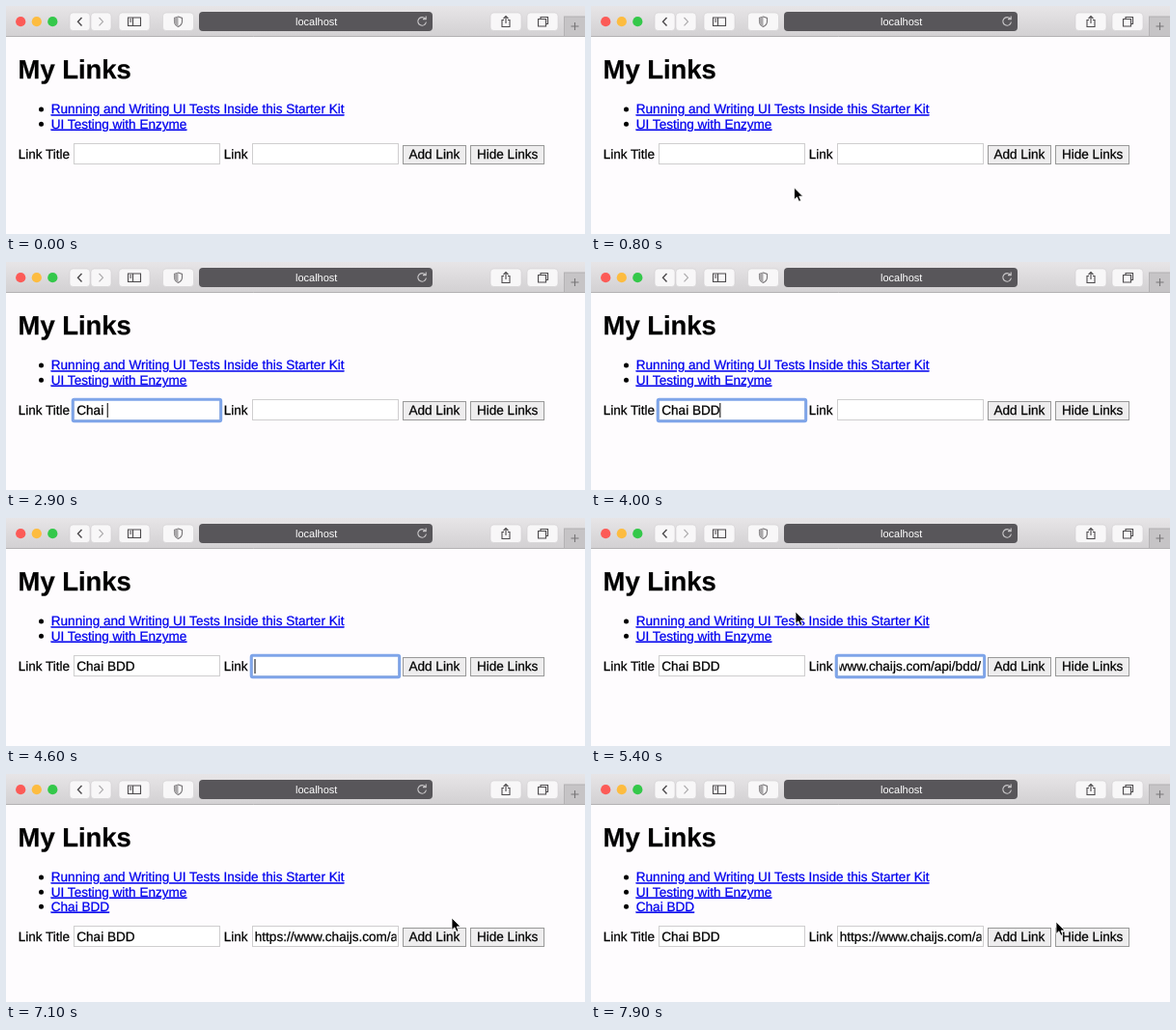
Write an HTML page that moves like this. It is 600x236 px and loops after 8000 ms.

```html
<!DOCTYPE html>
<html lang="en">
<head>
<meta charset="utf-8">
<title>My Links</title>
<style>
html, body { margin: 0; width: 100%; height: 100%; overflow: hidden; background: #fefcfe; }
svg { display: block; width: 600px; height: 236px; }
text { font: 13.55px "Liberation Sans", Arial, sans-serif; white-space: pre; stroke: #000; stroke-width: .25; text-rendering: geometricPrecision; }
.link { fill: #00e; stroke: #00e; text-decoration: underline; }
.tool { fill: #f8f7f8; stroke: #d0ced0; stroke-width: .6; }
.icon { fill: none; stroke: #4c4a4c; stroke-width: 1.1; }
.field { fill: #fff; stroke: #cfcecf; }
.ring { fill: none; stroke: #7fa5e9; stroke-width: 3; }
.button { fill: #eeedee; stroke: #999; }
.pressed rect { fill: #ababab; stroke: #ababab; }
.pressed text { fill: #fff; stroke: #fff; }
</style>
</head>
<body>
<svg viewBox="0 0 600 236">
  <defs>
    <linearGradient id="bar" x2="0" y2="1">
      <stop stop-color="#e7e5e7"/><stop offset="1" stop-color="#d2d0d2"/>
    </linearGradient>
    <clipPath id="clip"><rect x="257.5" y="140" width="147" height="28"/></clipPath>
  </defs>

  <rect width="600" height="236" fill="#fefcfe"/>
  <rect width="600" height="32" fill="url(#bar)"/>
  <path d="M0 31.5H600" stroke="#b4b2b4"/>
  <circle cx="15.2" cy="16.2" r="5.1" fill="#fc5b57"/>
  <circle cx="31.8" cy="16.2" r="5.1" fill="#fdbc40"/>
  <circle cx="48.3" cy="16.2" r="5.1" fill="#34c84a"/>
  <g class="tool">
    <rect x="66" y="7" width="21" height="18.5" rx="3.5"/>
    <rect x="88" y="7" width="21" height="18.5" rx="3.5"/>
    <rect x="117" y="7" width="32" height="18.5" rx="3.5"/>
    <rect x="162.5" y="7" width="32" height="18.5" rx="3.5"/>
    <rect x="502" y="7" width="32" height="18.5" rx="3.5"/>
    <rect x="540" y="7" width="32" height="18.5" rx="3.5"/>
  </g>
  <rect x="200" y="6" width="242" height="20" rx="4" fill="#58565a"/>
  <text x="321.7" y="20" text-anchor="middle" style="font-size:11px;fill:#fff;stroke:none">localhost</text>
  <path d="M434.5 13.2A4.3 4.3 0 1 0 435.4 16.5M435.2 10.5V13.6H432" class="icon" style="stroke:#c9c7c9"/>
  <g class="icon">
    <path d="M78.5 12L74.5 16.2L78.5 20.4" style="stroke-width:1.4"/>
    <path d="M96.5 12L100.5 16.2L96.5 20.4" style="stroke:#aaa8aa"/>
    <path d="M126.5 12H139.5V20.5H126.5ZM131.5 12V20.5M128 14H130.3M128 16H130.3"/>
    <path d="M178.5 11L182.5 12.5V16Q182.5 19.5 178.5 21.5Q174.5 19.5 174.5 16V12.5Z" style="stroke:#777577"/>
    <path d="M178.5 11V21.5Q174.5 19.5 174.5 16V12.5Z" style="fill:#aaa8aa;stroke:none"/>
    <path d="M516 14.5H514V21.5H522V14.5H520M518 18V10.5M515.5 13L518 10.5L520.5 13"/>
    <path d="M554 13.5V11.5H561.5V18.5H559.5M551.5 13.5H559.5V21H551.5Z"/>
  </g>
  <rect x="578.5" y="11" width="22" height="20.5" fill="#c6c4c6" stroke="#b4b2b4"/>
  <path d="M589.5 17V25M585.5 21H593.5" class="icon" style="stroke:#777577"/>

  <text x="12.6" y="75" style="font-size:27.4px;font-weight:bold">My Links</text>
  <g><circle cx="36.5" cy="107" r="2.5"/><text class="link" x="46.8" y="111.3">Running and Writing UI Tests Inside this Starter Kit</text></g>
  <g><circle cx="36.5" cy="122.3" r="2.5"/><text class="link" x="46.8" y="126.6">UI Testing with Enzyme</text></g>
  <g id="added"><circle cx="36.5" cy="137.3" r="2.5"/><text class="link" x="46.8" y="141.6">Chai BDD</text></g>

  <g id="form">
    <text x="12.7" y="158">Link Title</text>
    <rect class="field" x="70.5" y="142.5" width="151" height="21"/>
    <text id="title" x="73.3" y="158"></text>
    <text x="225.8" y="158">Link</text>
    <rect class="field" x="255.5" y="142.5" width="151" height="21"/>
    <g clip-path="url(#clip)"><text id="url" y="158"></text></g>
    <rect class="ring" id="ring" y="142.3" width="153.5" height="22.4" rx="1.5"/>
    <path id="caret" d="M0 146V161" stroke="#000"/>
    <g id="add">
      <rect class="button" x="411.5" y="144.5" width="65" height="19"/>
      <text x="417.5" y="158">Add Link</text>
    </g>
    <rect class="button" x="481.5" y="144.5" width="76" height="19"/>
    <text x="488" y="158">Hide Links</text>
  </g>
  <path id="mouse" d="M0 0V12.5L2.9 9.8L4.9 14.3L7 13.4L5.1 9H9Z" stroke="#fff" stroke-width=".8"/>
</svg>
<script>
const $ = id => document.getElementById(id);
const LOOP = 8000, FOCUS = 1100, TAB = 4400, PASTE = 4800, PRESS = 6200, RELEASE = 6400, ADD = 6500;
const keys = [1700, 2000, 2200, 2500, 2900, 3200, 3500, 3800];
const title = "Chai BDD", address = "https://www.chaijs.com/api/bdd/";

// Pointer stops: time, x, y
const enter = [[500, 230, 236], [1050, 196, 152]];
const leave = [[5300, 212, 97], [5400, 212, 97], [5800, 305, 188], [6150, 444, 151],
  [6600, 444, 151], [7050, 462, 149], [7300, 462, 149], [7800, 482, 153], [LOOP, 482, 153]];

const show = (id, on) => $(id).style.display = on ? "" : "none";

function along(path, t) {
  const next = path.findIndex(p => p[0] > t);
  const i = next < 0 ? path.length - 1 : Math.max(1, next);
  const [a, b] = [path[i - 1], path[i]];
  const u = Math.min(1, Math.max(0, (t - a[0]) / (b[0] - a[0])));
  const k = u * u * (3 - 2 * u);
  return [a[1] + (b[1] - a[1]) * k, a[2] + (b[2] - a[2]) * k];
}

function draw(t) {
  const typed = keys.filter(k => k <= t).length;
  const inTitle = t >= FOCUS && t < TAB;
  const inUrl = t >= TAB && t < PRESS;
  const pasted = t >= PASTE;

  $("title").textContent = title.slice(0, typed);
  $("url").textContent = pasted ? address : "";
  $("url").setAttribute("x", pasted && inUrl ? 404 - $("url").getComputedTextLength() : 257.8);

  show("ring", inTitle || inUrl);
  $("ring").setAttribute("x", inTitle ? 69.2 : 254.2);

  const lastInput = Math.max(...[FOCUS, ...keys, TAB, PASTE].filter(k => k <= t));
  show("caret", (inTitle || inUrl) && (t - lastInput) % 1060 < 530);
  const caretX = inTitle ? 73.6 + $("title").getComputedTextLength() : pasted ? 404.5 : 258;
  $("caret").setAttribute("transform", `translate(${caretX})`);

  $("add").setAttribute("class", t >= PRESS && t < RELEASE ? "pressed" : "");
  show("added", t >= ADD);
  $("form").setAttribute("transform", `translate(0 ${t >= ADD ? 15 : 0})`);

  const path = t < FOCUS ? enter : leave;
  show("mouse", t >= path[0][0]);
  $("mouse").setAttribute("transform", `translate(${along(path, t)})`);
}

const start = performance.now();
function tick() {
  draw((performance.now() - start) % LOOP);
  requestAnimationFrame(tick);
}
tick();
</script>
</body>
</html>
```
